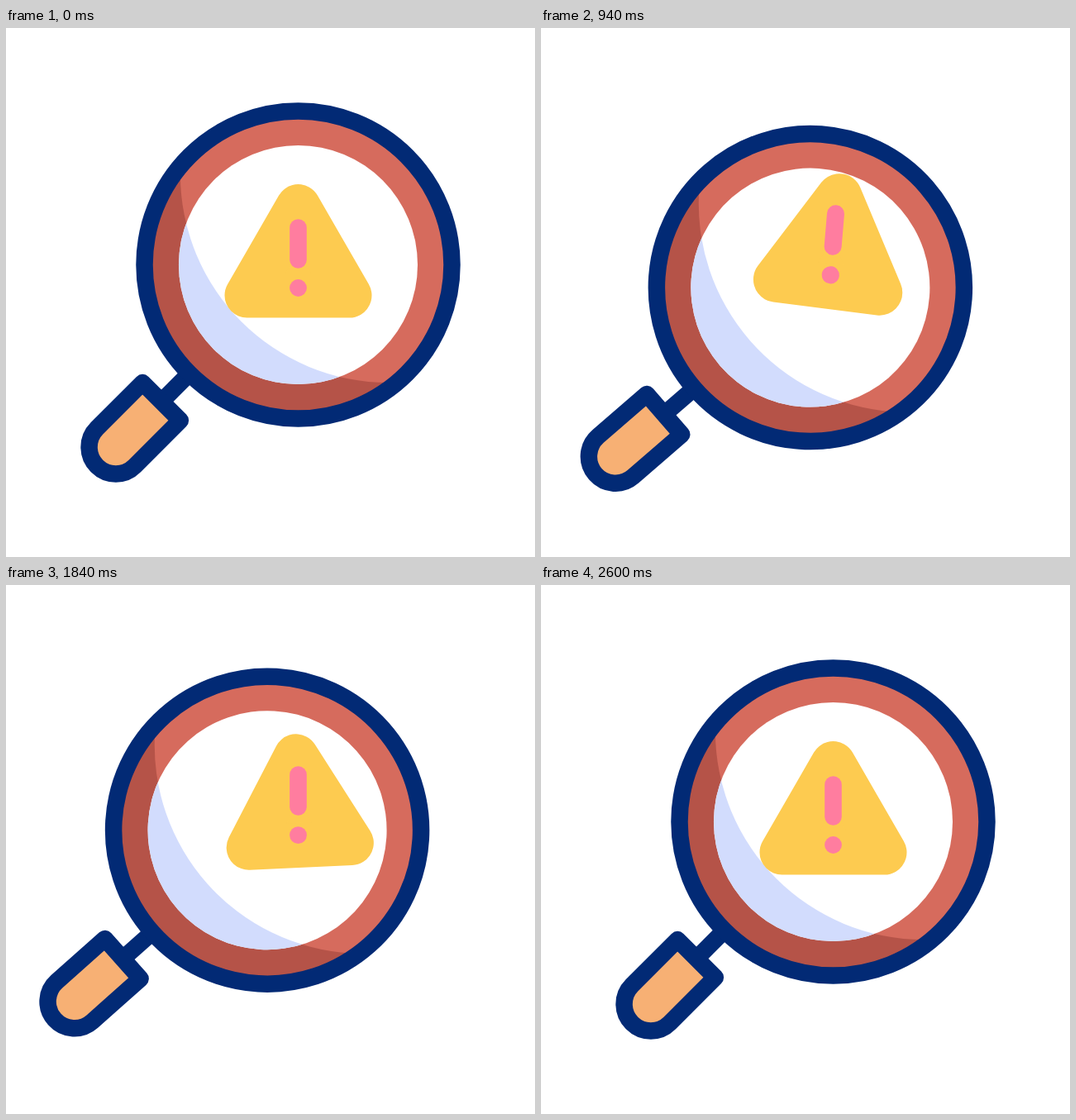
Recreate the animation shown at these times as an HTML page. Size 640 by 640 pixels, loop 2820 ms.

```html
<!DOCTYPE html>
<html lang="en">
<head>
<meta charset="utf-8">
<title>Magnifier with warning sign</title>
<style>
  html, body { margin: 0; height: 100%; overflow: hidden; background: #fff; }
  svg { display: block; width: 100vw; height: 100vh; }
</style>
</head>
<body>
<svg viewBox="0 0 640 640">
  <defs>
    <clipPath id="glass"><circle id="hole" r="144.5"/></clipPath>
    <mask id="crescent">
      <circle r="178" fill="#fff"/>
      <circle cx="109.6" cy="-109.6" r="252.2" fill="#000"/>
    </mask>
  </defs>

  <g id="lens">
    <g transform="rotate(135)" stroke="#022a75" stroke-width="20.5" stroke-linejoin="round">
      <path d="M190 0H234"/>
      <path d="M234 -32.3H312A32.3 32.3 0 0 1 312 32.3H234Z" fill="#f7b074"/>
    </g>
    <circle r="178" fill="#d66b5d"/>
    <circle r="178" fill="#b55348" mask="url(#crescent)"/>
    <circle r="144.5" fill="#fff"/>
    <circle r="144.5" fill="#d2dcfd" mask="url(#crescent)"/>
    <circle r="186" fill="none" stroke="#022a75" stroke-width="20.5"/>
  </g>

  <g clip-path="url(#glass)">
    <path id="sign" d="M0 -71.6L62 35.8H-62Z" fill="#fdcb50" stroke="#fdcb50" stroke-width="54" stroke-linejoin="round"/>
    <g id="mark" fill="#ff7d9f">
      <rect x="-10.3" y="-56.4" width="20.6" height="59.5" rx="10.3"/>
      <circle cy="26.8" r="10.4"/>
    </g>
  </g>
</svg>

<script>
const LOOP = 2820, START = 208, END = 2583;
const ORBIT = 628, HALF = 417, HOME = ORBIT + 3 * HALF;
const SQUASH = 420, PEAK = 1640, LAND = 2060;
const CX = 353.5, LENS_Y = 286.5, SIGN_Y = 287.7, R = 39;

const smooth = p => (1 - Math.cos(Math.PI * p)) / 2;
const out = p => 1 - (1 - p) ** 1.85;
const mix = (a, b, p) => a + (b - a) * p;
const part = (t, from, to) => Math.min(1, Math.max(0, (t - from) / (to - from)));

// Eases from each [time, value, ease] to the next.
function through(t, ...keys) {
  return keys.reduce(([t0, v], [t1, v1, ease = smooth]) =>
    [t1, mix(v, v1, ease(part(t, t0, t1)))].map((n, i) => i && t < t0 ? v : n))[1];
}

function lensAt(t) {
  if (t < ORBIT) return [R * part(t, START, ORBIT), 0];
  if (t < HOME) {
    // One and a half turns; the second dip is shallower.
    const a = (t - ORBIT) / HALF * Math.PI;
    return [R * Math.cos(a), (a < 2 * Math.PI ? R : 36) * Math.sin(a)];
  }
  // Over the top and down to the centre, at an even pace along the arc.
  const s = out(part(t, HOME, END)), u = s - .06 * Math.sin(2 * Math.PI * s);
  return [-R * (1 - u) ** 2 * (1 + 2 * u), -154 * u * (1 - u)];
}

const tiltAt = t => through(t, [620, 0], [772, 8.5], [1255, -7.75], [1660, 7.6], [2083, -3.3], [END, 0]);

// Squash, jump, land and settle.
const hop = (t, low, high, land, rest) =>
  through(t, [START, rest], [SQUASH, low], [PEAK, high, out], [LAND, land], [END, rest]);

// One swing to each side, its width changing on the way.
function sway(t, period, first, last) {
  const u = part(t, 400, 400 + period);
  return mix(first, last, u) * Math.sin(2 * Math.PI * u);
}

function place(id, x, y, angle = 0, scale = 1) {
  document.getElementById(id).setAttribute('transform',
    `translate(${CX + x} ${y}) rotate(${angle}) scale(${scale})`);
}

function draw(t) {
  const [x, y] = lensAt(t);
  place('lens', x, LENS_Y + y, tiltAt(t));
  place('hole', x, LENS_Y + y);

  const rise = hop(t, 12, -24.8, 9.8, 0), scale = hop(t, .945, 1.06, .935, 1);
  const lean = sway(t, 1611, 11, 3.4), swing = sway(t, 1320, 2, 19);
  place('sign', -.25 * lean, SIGN_Y + rise, lean, scale);
  place('mark', -.2 * swing, SIGN_Y + 1.38 * rise, swing, scale);
}

const begin = performance.now();
function tick() {
  draw((performance.now() - begin) % LOOP);
  requestAnimationFrame(tick);
}
tick();
</script>
</body>
</html>
```
